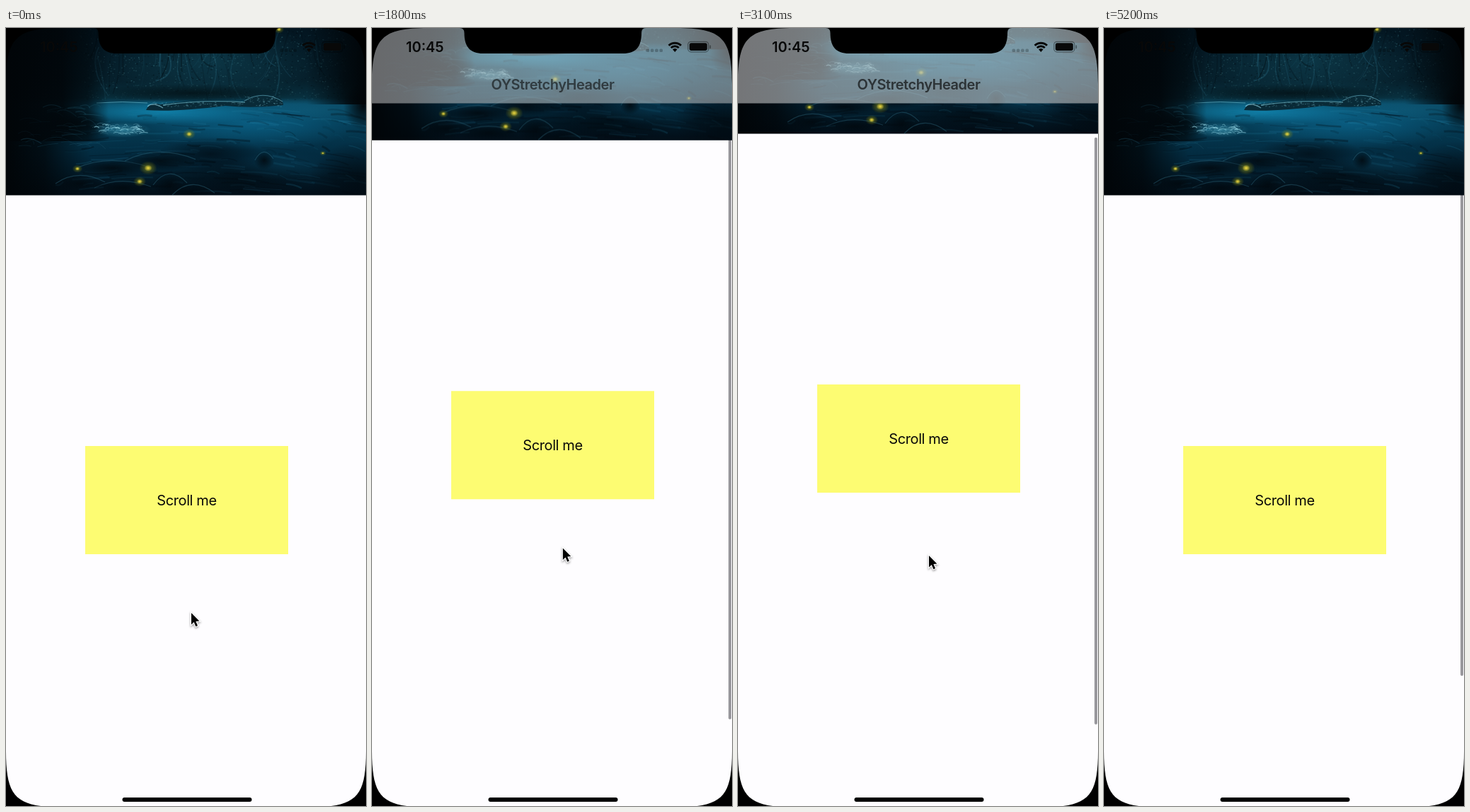
Recreate the animation shown at these times as an HTML page with a canvas. Size 509 by 1100 pixels, loop 5.8 s.

```html
<!DOCTYPE html>
<html lang="en">
<head>
<meta charset="utf-8">
<title>Stretchy header</title>
<style>
  html, body { margin: 0; width: 100%; height: 100%; overflow: hidden; background: #000; }
  canvas { display: block; width: 509px; height: 1100px; }
</style>
</head>
<body>
<canvas id="stage" width="509" height="1100"></canvas>
<script>
const W = 509, H = 1100, LOOP = 5800, STEP = 100;
const HEADER = 236.5, NAV = 106.5;
const ctx = document.getElementById('stage').getContext('2d');

// time, cursor x, cursor y, scroll offset
const KEYS = [
  [1200, 262, 827, 0], [1300, 263, 812, 5], [1500, 266, 777, 34],
  [2200, 275, 680, 136], [2500, 276, 663, 152], [2800, 275, 670, 154],
  [3100, 270, 746, 87], [3500, 253, 855, -18], [3700, 248, 890, -42],
  [4000, 249, 858, -12], [4200, 250, 837, -1], [4300, 250, 837, 0]
];

function pose(t) {
  const i = KEYS.findIndex(k => k[0] > t);
  if (i === 0) return KEYS[0].slice(1);
  if (i < 0) return KEYS[KEYS.length - 1].slice(1);
  const a = KEYS[i - 1], b = KEYS[i], u = (t - a[0]) / (b[0] - a[0]);
  return [1, 2, 3].map(j => a[j] + (b[j] - a[j]) * u);
}

function gradient(c, x0, y0, x1, y1, stops) {
  const g = c.createLinearGradient(x0, y0, x1, y1);
  stops.forEach(([p, color]) => g.addColorStop(p, color));
  return g;
}

function fillRect(c, color, x, y, w, h) {
  c.fillStyle = color;
  c.fillRect(x, y, w, h);
}

function roundRect(color, x, y, w, h, r) {
  ctx.fillStyle = color;
  ctx.beginPath();
  ctx.roundRect(x, y, w, h, r);
  ctx.fill();
}

// Soft elliptical spot
function glow(c, x, y, rx, ry, rgb, alpha) {
  c.save();
  c.translate(x, y);
  c.scale(rx, ry);
  const g = c.createRadialGradient(0, 0, 0, 0, 0, 1);
  g.addColorStop(0, `rgba(${rgb},${alpha})`);
  g.addColorStop(0.5, `rgba(${rgb},${alpha * 0.55})`);
  g.addColorStop(1, `rgba(${rgb},0)`);
  c.fillStyle = g;
  c.fillRect(-1, -1, 2, 2);
  c.restore();
}

function paintRiver() {
  const pic = document.createElement('canvas');
  pic.width = W;
  pic.height = 300;
  const c = pic.getContext('2d');
  let seed = 11;
  const rnd = (a, b) => {
    seed = (seed * 16807) % 2147483647;
    return a + (b - a) * seed / 2147483647;
  };
  const stroke = (color, width, x0, y0, cx, cy, x1, y1) => {
    c.strokeStyle = color;
    c.lineWidth = width;
    c.beginPath();
    c.moveTo(x0, y0);
    c.quadraticCurveTo(cx, cy, x1, y1);
    c.stroke();
  };

  fillRect(c, gradient(c, 0, 0, 0, 300, [
    [0, '#031520'], [0.25, '#06202c'], [0.33, '#08303f'], [0.36, '#0a4b66'],
    [0.45, '#053c55'], [0.6, '#032b40'], [0.78, '#020f19'], [1, '#01070c']
  ]), 0, 0, W, 300);

  // Forest
  glow(c, 290, 45, 150, 60, '20,85,105', 0.45);
  for (let i = 0; i < 55; i++) {
    const x = rnd(125, 450), y = rnd(-20, 40);
    stroke(`rgba(${i % 2 ? '45,115,140' : '0,6,10'},${rnd(0.1, 0.4)})`, rnd(0.5, 2),
      x, y, x + rnd(-15, 15), y + 30, x + rnd(-20, 20), y + rnd(35, 70));
  }
  for (let i = 0; i < 1500; i++) {
    fillRect(c, `rgba(${i % 3 ? '65,125,135' : '0,5,8'},${rnd(0.05, 0.4)})`,
      rnd(105, 480), rnd(0, 101), rnd(0.7, 2.5), rnd(0.6, 1.8));
  }
  glow(c, 265, 92, 150, 13, '2,14,18', 0.75);

  // Bright water
  glow(c, 225, 119, 145, 18, '18,145,190', 0.75);
  glow(c, 345, 135, 160, 38, '12,112,155', 0.6);
  glow(c, 430, 115, 85, 18, '15,90,120', 0.55);
  for (let i = 0; i < 170; i++) {
    const x = rnd(70, 490), y = rnd(114, 232), len = rnd(10, 60);
    const slope = (x - 210) * 0.03;
    stroke(i % 2 ? `rgba(35,130,165,${rnd(0.04, 0.22)})` : `rgba(0,8,14,${rnd(0.08, 0.35)})`,
      rnd(0.8, 3), x, y, x + len / 2, y + rnd(-4, 4), x + len, y + slope);
  }
  glow(c, 290, 178, 75, 24, '1,10,18', 0.7);
  glow(c, 330, 212, 100, 28, '1,8,14', 0.6);
  glow(c, 395, 195, 80, 20, '10,75,105', 0.3);

  // Far shore, log and boulder
  stroke('rgba(120,205,225,.55)', 1, 128, 106, 165, 103, 200, 106);
  c.fillStyle = '#092a37';
  c.beginPath();
  c.moveTo(198, 116);
  c.quadraticCurveTo(203, 104, 218, 108);
  c.quadraticCurveTo(280, 99, 336, 104);
  c.quadraticCurveTo(342, 94, 365, 94);
  c.quadraticCurveTo(391, 93, 392, 109);
  c.quadraticCurveTo(350, 114, 310, 110);
  c.quadraticCurveTo(240, 119, 198, 116);
  c.fill();
  stroke('rgba(150,215,230,.65)', 1.2, 200, 111, 207, 104, 222, 113);
  stroke('rgba(110,190,210,.6)', 1.3, 222, 109, 280, 101, 338, 105);
  stroke('rgba(100,175,195,.6)', 1.2, 337, 103, 364, 87, 391, 104);
  for (let i = 0; i < 130; i++) {
    const x = rnd(205, 390);
    fillRect(c, `rgba(125,195,210,${rnd(0.1, 0.45)})`,
      x, rnd(x > 336 ? 96 : 104, 111), rnd(0.8, 3), 1);
  }

  // Banks
  fillRect(c, gradient(c, 0, 0, 145, 0, [
    [0, '#010508'], [0.55, 'rgba(1,6,10,.94)'], [0.8, 'rgba(1,9,14,.7)'], [1, 'rgba(1,9,14,0)']
  ]), 0, 0, 145, 160);
  fillRect(c, gradient(c, 0, 0, 120, 0, [
    [0, '#010508'], [0.45, 'rgba(1,6,10,.8)'], [1, 'rgba(1,9,14,0)']
  ]), 0, 160, 120, 140);
  fillRect(c, gradient(c, 425, 0, W, 0, [
    [0, 'rgba(1,8,13,0)'], [0.65, 'rgba(1,7,11,.8)'], [1, '#010508']
  ]), 425, 0, 84, 108);
  glow(c, 505, 110, 28, 34, '1,5,8', 0.95);
  glow(c, 500, 215, 70, 55, '1,8,14', 0.7);
  glow(c, 95, 135, 55, 22, '1,7,11', 0.85);
  for (let i = 0; i < 45; i++) {
    const x = rnd(15, 130), y = rnd(110, 170);
    stroke(`rgba(35,90,110,${rnd(0.08, 0.32)})`, rnd(0.6, 1.6),
      x, y, x + 12, y - rnd(0, 10), x + rnd(12, 32), y + rnd(-5, 8));
  }

  // Rapids
  glow(c, 165, 144, 40, 11, '65,170,200', 0.5);
  for (let i = 0; i < 60; i++) {
    const x = rnd(122, 190), y = rnd(136, 151);
    stroke(`rgba(155,220,235,${rnd(0.15, 0.65)})`, rnd(0.6, 1.4),
      x, y, x + 4, y - 3, x + rnd(4, 13), y + rnd(-2, 2));
  }

  // Foreground rocks
  [[150, 198, 50, 10], [218, 188, 50, 12], [232, 222, 24, 15], [165, 226, 40, 9],
   [105, 220, 35, 11], [265, 236, 30, 14], [365, 187, 13, 11]].forEach(([x, y, rx, ry]) => {
    glow(c, x, y, rx * 1.1, ry * 1.2, '1,9,15', 0.85);
    stroke('rgba(60,130,155,.32)', 1.2, x - rx, y, x - rx * 0.1, y - ry * 2, x + rx, y - ry * 0.2);
  });

  // Fireflies
  [[101, 199, 4], [201, 198, 7], [189, 217, 5], [259, 150, 5], [448, 177, 2.5], [386, 2, 4]]
    .forEach(([x, y, r]) => {
      glow(c, x, y, r * 1.8, r * 1.4, '150,150,15', 0.6);
      glow(c, x, y, r * 0.8, r * 0.65, '255,230,70', 0.9);
    });
  return pic;
}

const river = paintRiver();

function label(text, x, y, weight, align, spacing) {
  ctx.font = `${weight} 20px Inter, "Liberation Sans", sans-serif`;
  ctx.textAlign = align;
  ctx.letterSpacing = spacing + 'px';
  ctx.fillStyle = '#080808';
  ctx.fillText(text, x, y);
}

function drawHeader(s) {
  const pull = Math.max(0, -s), k = 1 + pull / HEADER;
  ctx.save();
  ctx.beginPath();
  ctx.rect(0, 0, W, HEADER - s);
  ctx.clip();
  if (s > 0) ctx.translate(0, -s);
  ctx.translate(255, 118);
  ctx.scale(k, k);
  ctx.drawImage(river, -255, -118);
  ctx.restore();
}

function drawNav(s) {
  const alpha = Math.min(1, Math.max(0, s / 130));
  if (!alpha) return;
  ctx.save();
  ctx.globalAlpha = alpha;
  fillRect(ctx, gradient(ctx, 0, 0, W, 0, [
    [0, '#adadaf'], [0.2, '#b0b3b5'], [0.5, '#b0bfc5'], [0.75, '#b0babf'], [1, '#aeb0b2']
  ]), 0, 0, W, NAV);
  label('OYStretchyHeader', 255.5, 87, 600, 'center', -0.45);
  ctx.restore();
}

function drawStatus() {
  label('10:45', 48, 34, 600, 'left', 0);
  for (let i = 0; i < 4; i++) roundRect('rgba(0,0,0,.24)', 387.5 + i * 6.3, 29.5, 4.6, 4.6, 1.5);

  ctx.strokeStyle = ctx.fillStyle = '#080808';
  ctx.lineWidth = 2.9;
  [12.3, 7.8].forEach(r => {
    ctx.beginPath();
    ctx.arc(428.3, 33.5, r, -Math.PI * 0.75, -Math.PI * 0.25);
    ctx.stroke();
  });
  ctx.beginPath();
  ctx.moveTo(428.3, 34);
  ctx.arc(428.3, 33.5, 4.6, -Math.PI * 0.75, -Math.PI * 0.25);
  ctx.fill();

  ctx.strokeStyle = 'rgba(0,0,0,.4)';
  ctx.lineWidth = 1.2;
  ctx.beginPath();
  ctx.roundRect(446.8, 19.3, 29, 14.6, 4.2);
  ctx.stroke();
  roundRect('#080808', 448.8, 21.3, 25, 10.6, 2.6);
  roundRect('rgba(0,0,0,.4)', 477.4, 24.2, 1.7, 5, 1);
}

function corner(x, y, sx, sy) {
  ctx.save();
  ctx.translate(x, y);
  ctx.scale(sx, sy);
  ctx.beginPath();
  ctx.moveTo(-2, -2);
  ctx.lineTo(0, 79);
  ctx.bezierCurveTo(0, 14, 14, 0, 79, 0);
  ctx.lineTo(79, -2);
  ctx.fill();
  ctx.restore();
}

function drawDevice() {
  ctx.fillStyle = '#000';
  corner(0, 0, 1, 1);
  corner(W, 0, -1, 1);
  corner(0, H + 1.5, 1, -1);
  corner(W, H + 1.5, -1, -1);
  ctx.beginPath();
  ctx.moveTo(124, 0);
  ctx.quadraticCurveTo(130.5, 0, 130.5, 7);
  ctx.bezierCurveTo(130.5, 27, 139, 36, 157, 36);
  ctx.lineTo(355, 36);
  ctx.bezierCurveTo(373, 36, 381, 27, 381, 7);
  ctx.quadraticCurveTo(381, 0, 387, 0);
  ctx.fill();
  roundRect('#000', 164.5, 1088, 183, 6, 3);
}

function drawCursor(x, y) {
  ctx.save();
  ctx.translate(x, y);
  ctx.beginPath();
  [[0, 0], [0, 16.5], [3.7, 13], [6.4, 19.2], [9, 18], [6.4, 12], [11.4, 11.6]]
    .forEach(p => ctx.lineTo(...p));
  ctx.closePath();
  ctx.shadowColor = 'rgba(0,0,0,.4)';
  ctx.shadowBlur = 3;
  ctx.shadowOffsetY = 1.5;
  ctx.strokeStyle = '#fff';
  ctx.lineWidth = 2.4;
  ctx.stroke();
  ctx.shadowColor = 'transparent';
  ctx.fillStyle = '#000';
  ctx.fill();
  ctx.restore();
}

function draw(t) {
  const [x, y, s] = pose(t);
  fillRect(ctx, '#fefdff', 0, 0, W, H);
  fillRect(ctx, '#fdfc72', 112, 591 - s, 287, 153);
  label('Scroll me', 255.5, 675 - s, 400, 'center', -0.4);
  if (t >= 1300) roundRect('#98979c', 504, 86 + s * 0.79, 4, 830, 2);
  drawHeader(s);
  drawNav(s);
  drawStatus();
  drawDevice();
  if (t < 5000) drawCursor(x, y);
}

const start = performance.now();
function tick() {
  const t = (performance.now() - start) % LOOP;
  draw(Math.floor(t / STEP) * STEP);
  requestAnimationFrame(tick);
}
tick();
</script>
</body>
</html>
```
